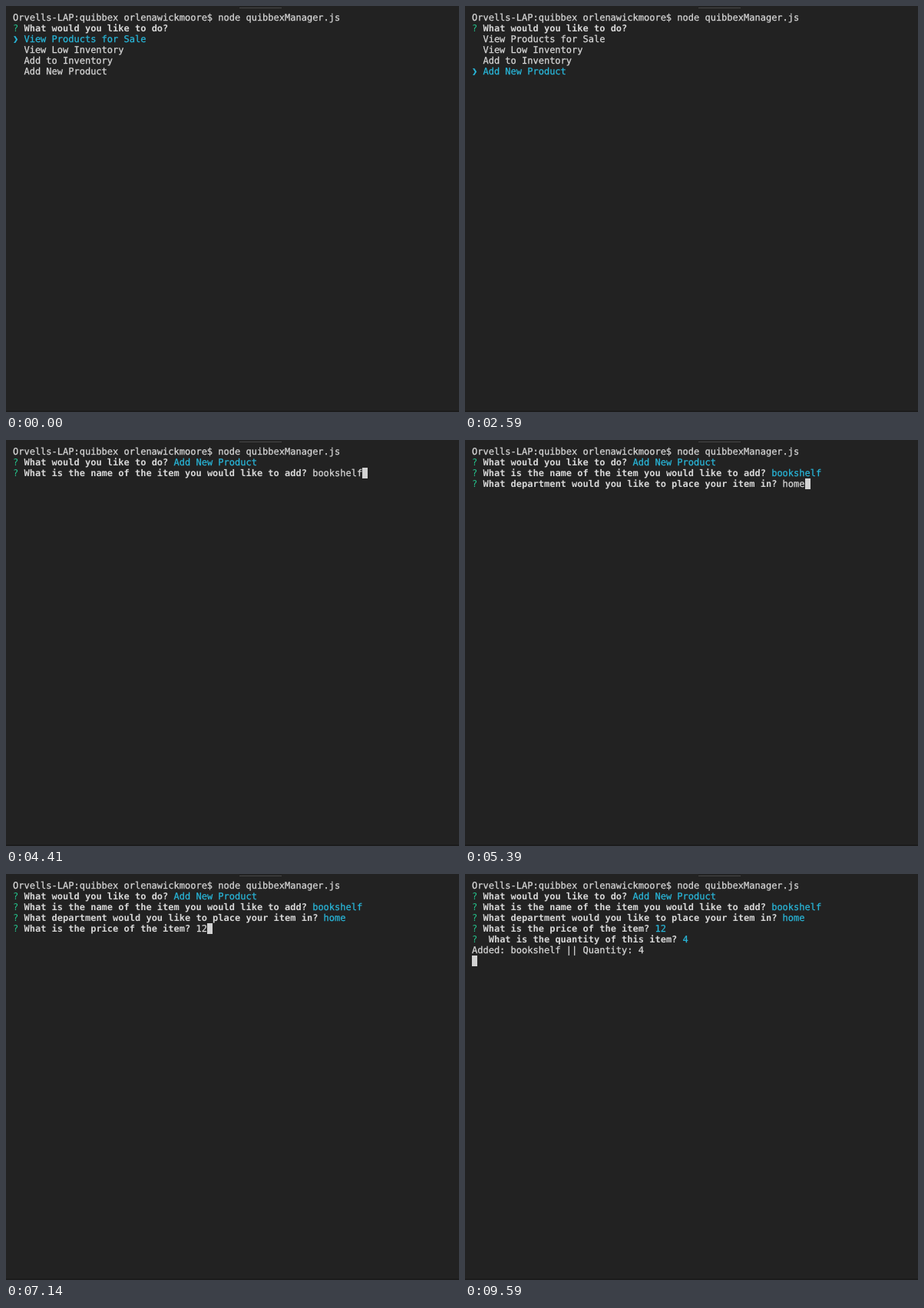
Write an HTML page that moves like this. It is 590 px wide and 528 px high and loops after 9.66 s.

```html
<!DOCTYPE html>
<html lang="en">
<head>
<meta charset="utf-8">
<title>Inventory prompt</title>
<style>
  html, body { margin: 0; width: 100%; height: 100%; overflow: hidden; background: #222; }
  body { position: relative; }
  body::before, body::after { content: ""; position: absolute; }
  body::before { left: 304px; top: 2px; width: 55px; height: 1px; background: #484848; }
  body::after { left: 0; right: 0; bottom: 0; height: 2px; background: #1c1c1c; }
  pre {
    position: absolute; left: 9px; top: 8px; margin: 0;
    font: 12px/14px "DejaVu Sans Mono", monospace;
    text-rendering: geometricPrecision;
    color: #d8d8d8; -webkit-text-stroke: .25px;
  }
  b { -webkit-text-stroke: 0; }
  i { font-style: normal; color: #29b8db; }
  u { text-decoration: none; color: #24c48c; -webkit-text-stroke: 0; }
  s { text-decoration: none; background: #d2d2d2; }
</style>
</head>
<body>
<pre id="term"></pre>
<script>
const LOOP = 9660, STEP = 70;
const term = document.getElementById("term");
const command = "Orvells-LAP:quibbex orlenawickmoore$ node quibbexManager.js";
const menu = ["View Products for Sale", "View Low Inventory", "Add to Inventory", "Add New Product"];
const menuMoves = [2030, 2240, 2450], menuEnter = 3010;

// Each key press adds `chunk` characters, one press every `gap` ms.
const questions = [
  { text: "What is the name of the item you would like to add?", answer: "bookshelf", start: 3850, gap: 70, chunk: 3, enter: 4480 },
  { text: "What department would you like to place your item in?", answer: "home", start: 4970, gap: 140, chunk: 1, enter: 5880 },
  { text: "What is the price of the item?", answer: "12", start: 6860, gap: 210, chunk: 1, enter: 7490 },
  { text: " What is the quantity of this item?", answer: "4", start: 8540, gap: 70, chunk: 1, enter: 9030 }
];

const cursor = "<s> </s>";
const cyan = s => `<i>${s}</i>`;
const ask = (text, reply = "") => `<u>?</u> <b>${text}</b> ${reply}`;

function typed(q, t) {
  const presses = Math.max(0, Math.floor((t - q.start) / q.gap) + 1);
  return q.answer.slice(0, presses * q.chunk);
}

function screen(t) {
  const lines = [command];
  const title = "What would you like to do?";
  if (t < menuEnter) {
    const chosen = menuMoves.filter(m => t >= m).length;
    lines.push(ask(title));
    menu.forEach((item, i) => lines.push(i === chosen ? cyan("❯ " + item) : "  " + item));
    return lines;
  }
  lines.push(ask(title, cyan(menu[3])));
  for (const q of questions) {
    if (t < q.enter) {
      lines.push(ask(q.text, typed(q, t) + cursor));
      return lines;
    }
    lines.push(ask(q.text, cyan(q.answer)));
  }
  lines.push(`Added: ${questions[0].answer} || Quantity: ${questions[3].answer}`, cursor);
  return lines;
}

let shown = "";
const begin = performance.now();
function frame(now) {
  const t = Math.floor(Math.max(0, now - begin) % LOOP / STEP) * STEP;
  const html = screen(t).join("\n");
  if (html !== shown) term.innerHTML = shown = html;
  requestAnimationFrame(frame);
}
frame(begin);
</script>
</body>
</html>
```
